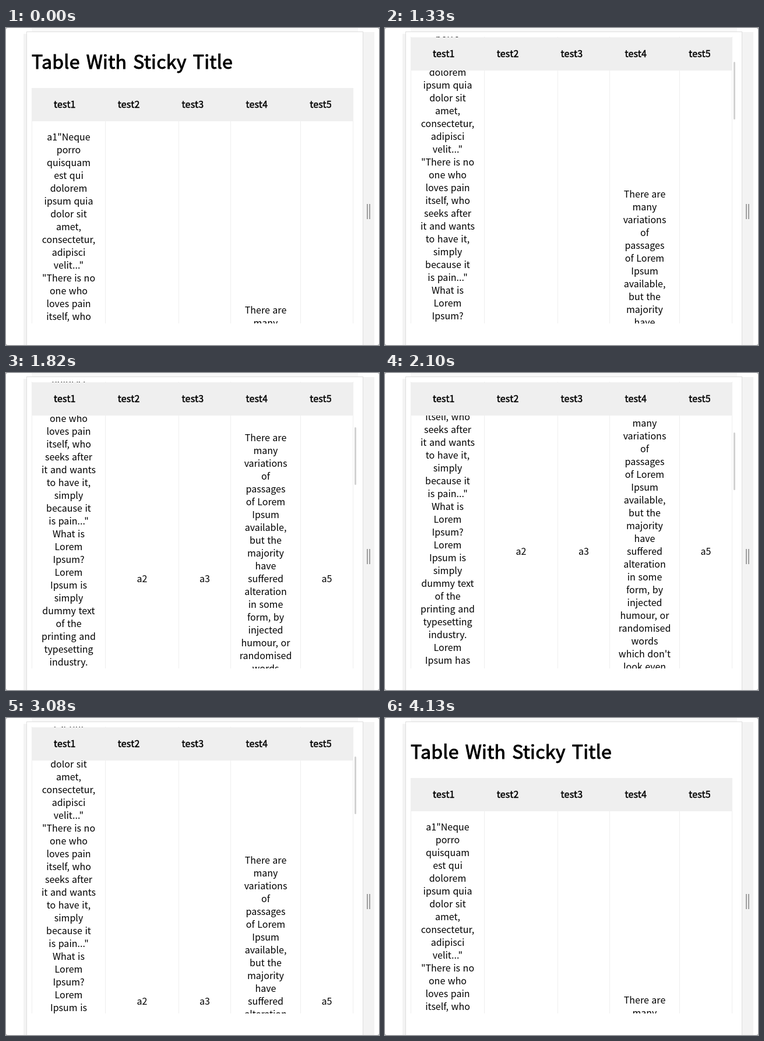
These frames come from a looping animation (640x544 px, 4200 ms). An HTML page:

```html
<!DOCTYPE html>
<html lang="en">
<head>
<meta charset="utf-8">
<title>Table With Sticky Title</title>
<style>
  html, body { margin: 0; width: 100%; height: 100%; overflow: hidden; background: #aaa; }
  div, h1 { position: absolute; margin: 0; box-sizing: border-box; white-space: pre; }
  #stage {
    left: 0; top: 0; width: 640px; height: 544px; overflow: hidden;
    background: #fff; border-radius: 3px; color: #000;
    font: 16px/22px "Noto Sans CJK SC", "Noto Sans CJK JP", "Noto Sans", sans-serif;
  }
  .gutter { background: #f3f3f3; }
  #top { left: 44px; top: 0; width: 560px; height: 7px; background: #f8f8f8; }
  #left { left: 30px; top: 10px; width: 6px; height: 534px; }
  #right { left: 613px; top: 7px; width: 19px; height: 537px; }
  #card { left: 35px; top: 6px; width: 578px; height: 550px; background: #fff; border: 1px solid #dedede; }
  .grip { top: 302px; width: 2px; height: 26px; background: #a0a0a0; }
  #view { left: 0; top: 0; width: 640px; height: 544px; clip-path: inset(15px 44px 37px 44px); }
  #page { left: 0; top: 0; width: 640px; height: 1300px; }
  /* a thin stroke on the regular face gives a medium weight */
  h1 {
    left: 44px; top: 36px; font-size: 32px; line-height: 40px; font-weight: 400;
    letter-spacing: .3px; word-spacing: 3.5px; -webkit-text-stroke: 1px #000;
  }
  .rule { top: 160px; width: 1px; height: 1132px; background: #eee; }
  .cell { width: 140px; margin-left: -70px; text-align: center; word-spacing: 1px; }
  #head { left: 44px; top: 0; width: 552px; height: 56.5px; background: #efefef; }
  #head div { top: 0; line-height: 54px; letter-spacing: .2px; -webkit-text-stroke: .5px #000; }
  #thumb { left: 598px; top: 0; width: 3px; height: 99px; border-radius: 1.5px; background: #d2d2d2; }
</style>
</head>
<body>
<div id="stage">
  <div id="top" class="gutter"></div>
  <div id="left" class="gutter"></div>
  <div id="right" class="gutter"></div>
  <div id="card"></div>
  <div class="grip" style="left:619px"></div>
  <div class="grip" style="left:623px"></div>
  <div id="view">
    <div id="page"><h1>Table With Sticky Title</h1></div>
    <div id="head"></div>
  </div>
  <div id="thumb"></div>
</div>
<script>
const LOOP = 4200, TICK = 70;
const HEAD_TOP = 103, STUCK_TOP = 16;
const $ = id => document.getElementById(id);
const page = $('page'), head = $('head'), thumb = $('thumb');

function add(parent, cls, left, top, text = '') {
  const el = document.createElement('div');
  el.className = cls;
  el.style.left = left + 'px';
  if (top !== null) el.style.top = top + 'px';
  el.textContent = text;
  parent.append(el);
}

const first = `a1"Neque|porro|quisquam|est qui|dolorem|ipsum quia|dolor sit|amet,|consectetur,|adipisci|velit..."|"There is no|one who|loves pain|itself, who|seeks after|it and wants|to have it,|simply|because it|is pain..."|What is|Lorem|Ipsum?|Lorem|Ipsum is|simply|dummy text|of the|printing and|typesetting|industry.|Lorem|Ipsum has|been the`;
const fourth = `There are|many|variations|of|passages|of Lorem|Ipsum|available,|but the|majority|have|suffered|alteration|in some|form, by|injected|humour, or|randomised|words|which don't|look even|slightly|believable.`;
const lines = s => s.replaceAll('|', '\n');

[44, 170, 296, 385, 505, 595].forEach(x => add(page, 'rule', x, null));
add(page, 'cell', 107.5, 175, lines(first));
add(page, 'cell', 233.5, 714, 'a2');
add(page, 'cell', 341, 714, 'a3');
add(page, 'cell', 445.5, 472, lines(fourth));
add(page, 'cell', 550.5, 714, 'a5');
for (let i = 0; i < 5; i++) add(head, '', 38 + 109.8 * i, null, 'test' + (i + 1));

// [time in ms, scroll offset in px]
const path = [
  [910, 0], [980, 4], [1050, 22], [1120, 56], [1190, 100], [1330, 199],
  [1400, 237], [1470, 268], [1540, 295], [1680, 338], [1820, 373],
  [1960, 401], [2100, 420], [2660, 420], [2730, 410], [2800, 375],
  [2870, 329], [3360, 122], [3640, 0]
];

function scrollAt(t) {
  const i = path.findIndex(p => p[0] > t);
  if (i <= 0) return 0;
  const [t0, s0] = path[i - 1], [t1, s1] = path[i];
  return Math.round(s0 + (s1 - s0) * (t - t0) / (t1 - t0));
}

function thumbAlpha(t) {
  if (t < 980 || (t >= 2590 && t < 2730) || t >= 4130) return 0;
  return t >= 4060 ? 0.3 : 1;
}

const start = performance.now();
function draw() {
  const elapsed = Math.max(0, performance.now() - start) % LOOP;
  const t = Math.floor(elapsed / TICK) * TICK;
  const s = scrollAt(t);
  page.style.transform = `translateY(${-s}px)`;
  head.style.transform = `translateY(${Math.max(STUCK_TOP, HEAD_TOP - s)}px)`;
  thumb.style.transform = `translateY(${Math.round(18 + s * 0.2)}px)`;
  thumb.style.opacity = thumbAlpha(t);
  requestAnimationFrame(draw);
}
draw();
</script>
</body>
</html>
```
